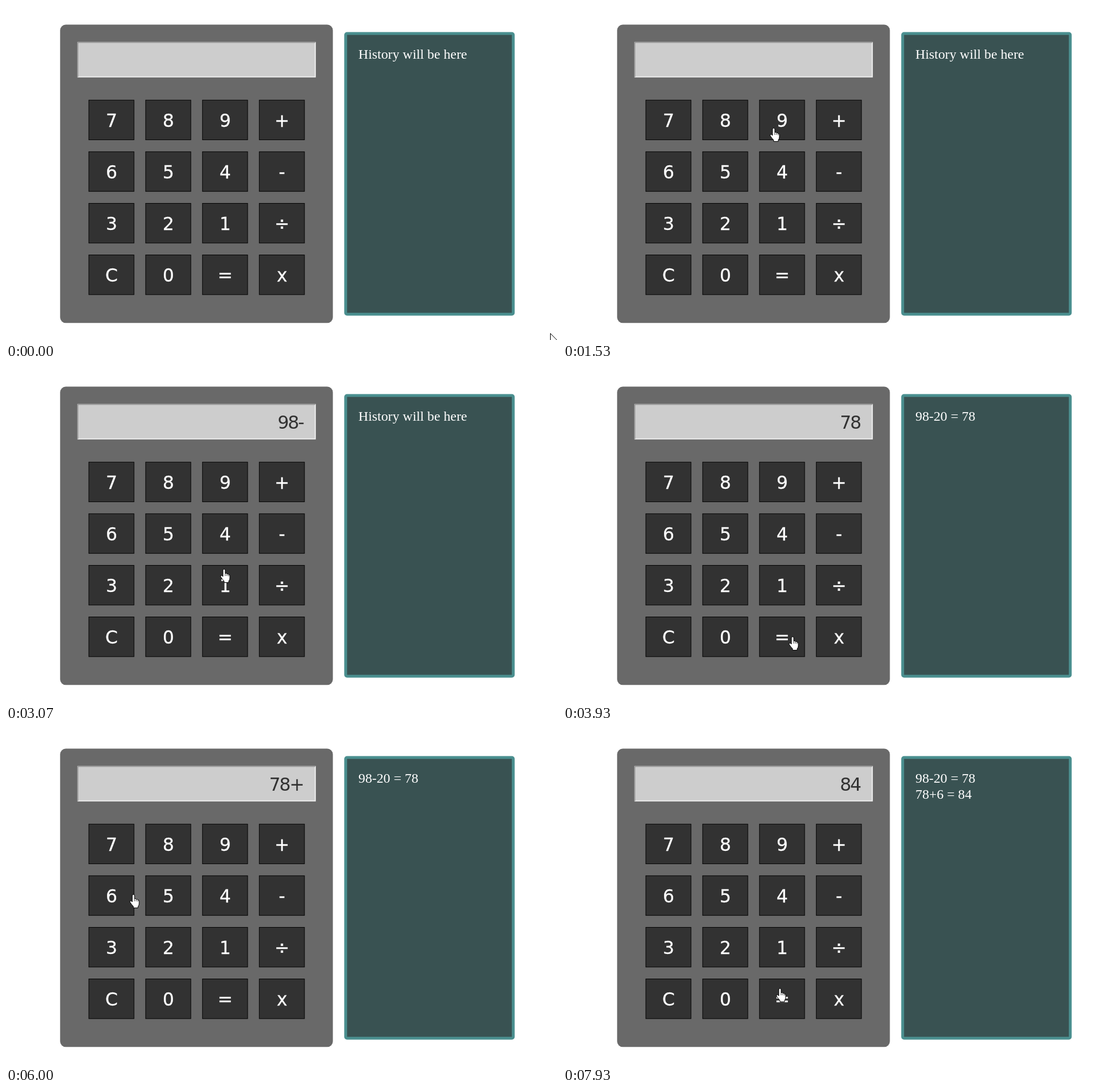
Animation, 960 px wide and 583 px high, one loop 8000 ms. Source, as an HTML page:

```html
<!DOCTYPE html>
<html lang="en">
<head>
<meta charset="utf-8">
<title>Calculator with history</title>
<style>
  html, body { margin: 0; width: 100%; height: 100%; overflow: hidden; background: #fff; }
  svg { display: block; width: 960px; height: 583px; }
  .key, #display { font: 31.5px "DejaVu Sans", sans-serif; }
  .key { fill: #fff; stroke: #fff; stroke-width: .3; text-anchor: middle; }
  #display { fill: #323232; text-anchor: end; letter-spacing: -2.1px; }
  .history { fill: #fff; font: 24px "Liberation Serif", serif; }
</style>
</head>
<body>
<svg viewBox="0 0 960 583">
  <g transform="translate(94.3 32.6) scale(.99)">
    <rect width="480" height="526" rx="10" fill="#696969"/>
    <rect x="30.5" y="30.5" width="419.5" height="62.5" fill="#eee"/>
    <path d="M30.5 93V30.5H450L448 32.5H32.5V91Z" fill="#9a9a9a"/>
    <rect x="32.5" y="32.5" width="415.5" height="58.5" fill="#cdcdcd"/>
    <text id="display" x="428" y="74"></text>
    <g id="keys"></g>
    <rect x="500" y="13" width="300" height="500" rx="5" fill="#4a8f8f"/>
    <rect x="505" y="18" width="290" height="490" fill="#395252"/>
    <text class="history" x="525" y="60"></text>
    <text class="history" x="525" y="88"></text>
  </g>
  <g id="cursor" stroke="#000" stroke-linejoin="round">
    <path id="arrow" fill="#fff" d="M.5 .5V17.5L4.5 13.8L7.2 20L9.8 19L7.2 12.8H12.5Z"/>
    <g id="hand">
      <path fill="#fff" d="M-2 1Q-2 -1 0 -1T2 1V6.5q2.6 -.6 3 1q2.4 -.5 2.8 1q2.2 -.2 2.2 2.3V15q0 2.6 -2 5V22.5H0V20Q-3 17 -5.8 12.7Q-6.8 10 -4.5 10L-2 12Z"/>
      <path fill="none" stroke-width=".8" d="M2 6.5V11M5 7.5V11M7.8 8.5V11.5"/>
    </g>
  </g>
</svg>
<script>
const LOOP = 8000, FPS = 15;
const $ = id => document.getElementById(id);
const historyLines = document.querySelectorAll(".history");

// Each glide eases the pointer from where it rests to x, y
const home = { x: 948, y: 571 };
const glides = [
  { from: 470, to: 1200, x: 376, y: 220 },
  { from: 1270, to: 1530, x: 367, y: 214 },
  { from: 1730, to: 2000, x: 302, y: 215 },
  { from: 2070, to: 2330, x: 540, y: 395 },
  { from: 2330, to: 2530, x: 482, y: 296 },
  { from: 2670, to: 3060, x: 380, y: 352 },
  { from: 3060, to: 3530, x: 300, y: 447 },
  { from: 3670, to: 3870, x: 400, y: 470 },
  { from: 4200, to: 5000, x: 479, y: 305 },
  { from: 5070, to: 5200, x: 475, y: 233 },
  { from: 5530, to: 6130, x: 190, y: 295 },
  { from: 6700, to: 7000, x: 520, y: 432 },
  { from: 7000, to: 7330, x: 384, y: 462 },
  { from: 7800, to: 7930, x: 378, y: 452 }
];

const presses = [
  [1733, "9"], [2000, "8"], [2600, "-"], [3333, "2"], [3667, "0"], [3867, "="],
  [5467, "+"], [6267, "6"], [7533, "="]
];

$("keys").innerHTML = [..."789+654-321÷C0=x"].map((label, i) => {
  const x = 50.5 + 100 * (i % 4), y = 133 + 91 * Math.floor(i / 4);
  return `<rect x="${x}" y="${y}" width="79.5" height="70" fill="#323232" stroke="#000"/>
    <text class="key" x="${x + 40}" y="${y + 47}">${label}</text>`;
}).join("");

function calculate(sum) {
  const [, a, sign, b] = sum.match(/(\d+)([+-])(\d+)/);
  return String(sign === "+" ? +a + +b : a - b);
}

function calculatorAt(t) {
  let display = "";
  const history = [];
  for (const [time, key] of presses) {
    if (time > t + 1) break;
    if (key === "=") {
      const result = calculate(display);
      history.push(`${display} = ${result}`);
      display = result;
    } else display += key;
  }
  return { display, history: history.length ? history : ["History will be here"] };
}

function pointerAt(t) {
  let { x, y } = home;
  for (const glide of glides) {
    const k = Math.min(1, Math.max(0, (t - glide.from) / (glide.to - glide.from)));
    const eased = (1 - Math.cos(Math.PI * k)) / 2;
    x += (glide.x - x) * eased;
    y += (glide.y - y) * eased;
  }
  return [Math.round(x), Math.round(y)];
}

function draw(now) {
  // The picture advances in whole steps
  const t = Math.floor((now % LOOP + 3.4) * FPS / 1000) * 1000 / FPS;
  const [x, y] = pointerAt(t);
  const overKeys = x > 144 && x < 520 && y > 164 && y < 504;
  const { display, history } = calculatorAt(t);

  $("display").textContent = display;
  historyLines.forEach((line, i) => line.textContent = history[i] ?? "");
  $("cursor").setAttribute("transform", `translate(${x} ${y})`);
  $("hand").style.display = overKeys ? "" : "none";
  $("arrow").style.display = overKeys ? "none" : "";
}

const start = performance.now();
function tick() {
  draw(performance.now() - start);
  requestAnimationFrame(tick);
}
tick();
</script>
</body>
</html>
```
